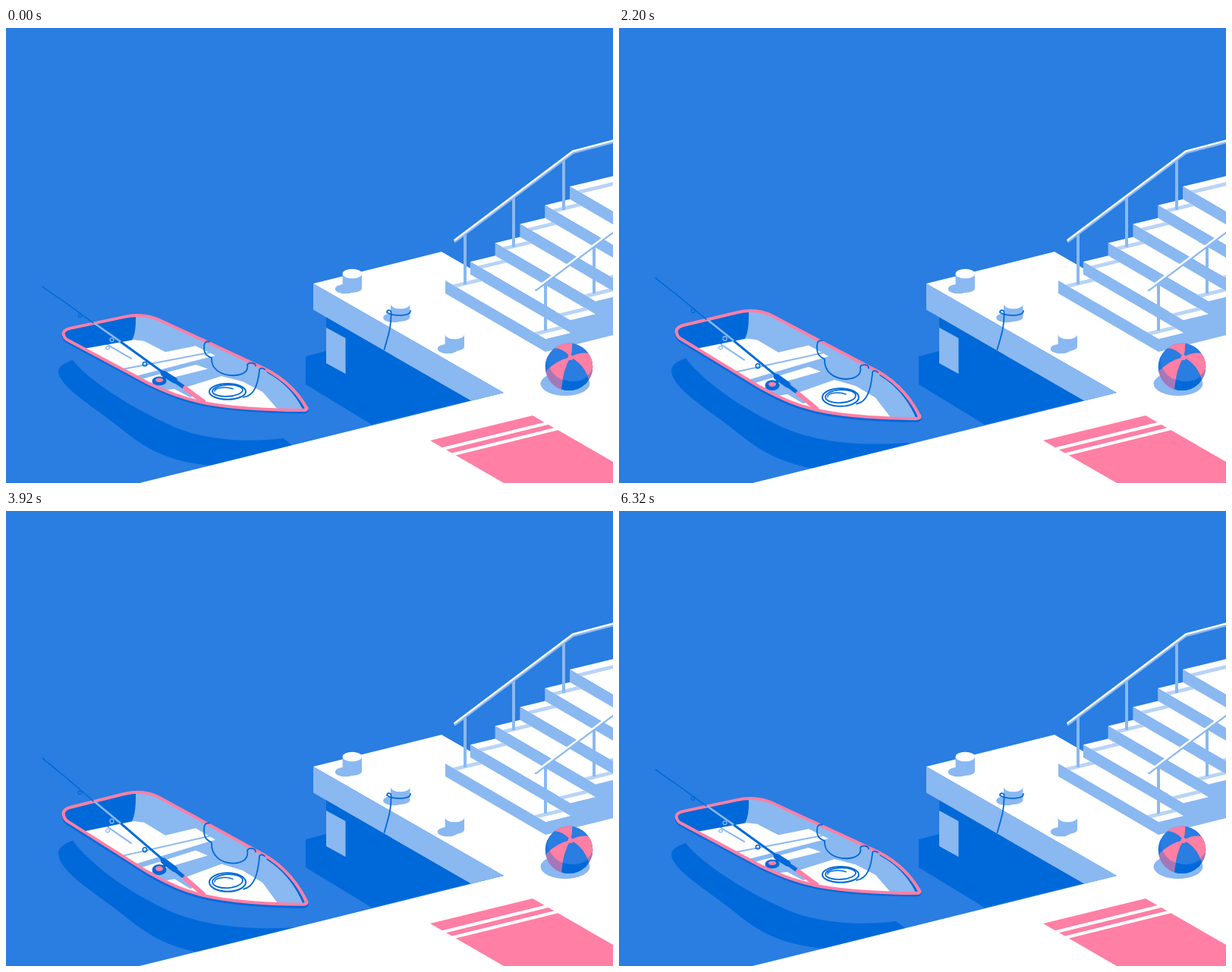
Write an HTML page that moves like this. It is 800 by 600 pixels and loops after 6360 ms.

```html
<!DOCTYPE html>
<html lang="en">
<head>
<meta charset="utf-8">
<title>Boat at the pier</title>
<style>
  html, body { margin: 0; width: 100%; height: 100%; overflow: hidden; background: #2a7de1; }
  svg { display: block; width: 800px; height: 600px; }
  .deep { fill: #0069d9; }
  .sea { fill: #2a7de1; }
  .pale { fill: #8ab8f1; }
  .white { fill: #fff; }
  .pink { fill: #ff7fa5; }
  .line { fill: none; stroke: #0069d9; stroke-width: 2; stroke-linecap: round; stroke-linejoin: round; }
  .line.light { stroke: #8ab8f1; }
  .line.rose { stroke: #ff7fa5; }
  .line.snow { stroke: #fff; }
  #boat *, #rim { vector-effect: non-scaling-stroke; }
</style>
</head>
<body>
<svg viewBox="0 0 800 600">
  <defs>
    <path id="rim" d="M76 400Q74 392.500 84 389L154 370.500Q180 363 202 375L265 411.500L330 449.500Q374 472 396.500 521Q397 524.500 391 524.500C345 524 300 521 265 513C235 506 215 496 188 480L80 407.500Q77 405 76 400Z"/>
    <clipPath id="hold"><use href="#rim"/></clipPath>
    <clipPath id="round"><circle cx="742" cy="446.800" r="31.300"/></clipPath>
  </defs>

  <rect class="sea" width="800" height="600"/>
  <path id="shade" class="deep"/>

  <g id="boat">
    <use href="#rim" class="line" y="3" style="stroke-width:4"/>
    <g clip-path="url(#hold)">
      <rect class="pale" x="60" y="350" width="350" height="190"/>
      <path class="deep" d="M60 380L171 360V374Q171 400 165 410L105 424L60 412Z"/>
      <path class="white" d="M105 422L168 408L182 410L210 428L250 418L276 434L164 470L100 440Z"/>
      <path class="line light" d="M152 457L268 429"/>
      <path class="white" d="M178 473L250 449L266 456L192 479Z"/>
      <path class="white" d="M205 492L238 486L284 468L312 477L338 494L363 530L250 525Z"/>
      <path class="line light" d="M216 481L243 499" style="stroke-width:6"/>
      <path class="line" d="M117 382L135 417" style="stroke-width:1.500"/>
      <path class="line light" d="M135 417L165 439"/>
      <ellipse class="line light" cx="134" cy="421.500" rx="2.500" ry="2" style="stroke-width:1.200"/>
      <path class="line" d="M345 461Q376 482 392 521" style="stroke-width:3"/>
    </g>
    <use href="#rim" class="line rose" style="stroke-width:4"/>

    <path class="line" d="M268 411C262 410 261 414 261 421C261 433 266 435 271 438C270 457 284 467 300 467C314 466 320 459 318 449C320 445 329 445 329 451M334 460C333 454 338 454 341 457M334 459C332 480 328 500 313 503" style="stroke-width:1.800"/>
    <ellipse class="line" cx="292" cy="493.500" rx="24" ry="13"/>
    <ellipse class="line" cx="292" cy="492" rx="20" ry="9.500" transform="rotate(-4 292 492)" style="stroke-width:1.800"/>
    <path class="line" d="M275 493C274 487 290 485 299 489" style="stroke-width:1.500"/>

    <path class="line" d="M50 321Q47 319 49 321L79 347L115 380" style="stroke-width:1.500"/>
    <ellipse class="line" cx="97.500" cy="368" rx="2.300" ry="2.500" style="stroke-width:1.200"/>
    <path class="line light" d="M117 381L151 411" style="stroke-width:2.500"/>
    <ellipse class="line light" cx="139.500" cy="408" rx="2.500" ry="3" style="stroke-width:1.300"/>
    <path class="line" d="M152 412L207 462" style="stroke-width:3"/>
    <ellipse class="line" cx="183" cy="448" rx="2.700" ry="3.200" style="stroke-width:1.500"/>
    <path class="line" d="M206 462L233 485" style="stroke-width:5"/>
    <path class="line" d="M208 464L222 475" style="stroke-width:8"/>
    <path class="line" d="M204 473L214 468" style="stroke-width:4"/>
    <ellipse class="deep" cx="202" cy="476" rx="9.500" ry="7.500"/>
    <ellipse class="pink" cx="202" cy="474.500" rx="5" ry="3.500"/>
    <path class="line rose" d="M236 488L260 510" style="stroke-width:6"/>
  </g>

  <path class="deep" d="M422 378L613 487V491L482 523L395 470V433L422 426Z"/>
  <path class="pale" d="M422 395L447.500 409V456L422 442Z"/>
  <path class="white" d="M405 337L574 295L711 374H800V600H176L656 481Z"/>
  <path class="pale" d="M405 337L656 481L613 491.500L405 371.500Z"/>
  <g id="bollards"></g>
  <path class="line" d="M533 373C533 380 512 381 502 375C502 371 508 371 507.500 376C508 395 503 408 498.500 424" style="stroke-width:1.800"/>

  <g id="stairs"></g>
  <g id="rails"></g>

  <ellipse class="pale" cx="737" cy="469" rx="32.500" ry="16"/>
  <g clip-path="url(#round)">
    <rect class="sea" x="710" y="414" width="65" height="65"/>
    <path class="pink" d="M744 434Q734 422 722 422L730 412H746Q747 424 744 434Z"/>
    <path class="pink" d="M744 434Q756 427 769 429L780 440V464H768Q763 444 744 434Z"/>
    <path class="pink" d="M744 434Q733 452 732 480L708 470L712 452Q726 438 744 434Z"/>
    <path fill="#0069d9" fill-opacity=".35" fill-rule="evenodd" d="M700 400H785V490H700ZM714 437A31 29 0 1 0 776 437A31 29 0 1 0 714 437Z"/>
    <path class="deep" d="M732 480Q732 471 735 464Q753 470 767 460L769 480Z"/>
  </g>
  <circle class="pink" cx="744" cy="434.500" r="3.500"/>

  <path class="pink" d="M559 544L694 511L800 572V600H656Z"/>
  <path class="line snow" d="M576 555L716 520.500M586 563L728 528" style="stroke-width:4"/>
</svg>
<script>
const $ = id => document.getElementById(id);
const poly = (x, y, pts, fill) =>
  `<polygon fill="${fill}" points="${pts.map(([a, b]) => `${x + a},${y + b}`).join(' ')}"/>`;
const PALE = '#8ab8f1', BAND = '#b8d3f7';

// Bollards: centre x, top y, height, shadow dx and dy
$('bollards').innerHTML = [[456.3, 324, 19, -9, 20], [519.7, 364, 17, -9, 18], [591.3, 404, 16, -9, 19]]
  .map(([x, y, h, dx, dy]) => `
    <ellipse class="pale" cx="${x + dx}" cy="${y + dy}" rx="13.500" ry="6.300"/>
    <path class="pale" d="M${x - 12.7} ${y}V${y + h}A12.700 6 0 0 0 ${x + 12.7} ${y + h}V${y}Z"/>
    <ellipse class="white" cx="${x}" cy="${y}" rx="12.700" ry="6.300"/>`).join('');

// Stairs, from the top step down
let steps = poly(0, 0, [[711, 427], [711, 410], [743, 402], [743, 385], [776, 377], [776, 360], [800, 354], [800, 405]], PALE);
for (let i = 5; i >= 0; i--) {
  const x = 579 + 32.8 * i, y = 333 - 24.8 * i;
  const d = i === 5 ? 2 : 1;
  const w = 33 * d, r = -8 * d;
  steps += poly(x, y, [[0, 0], [w, r], [w + 132, r + 77], [132, 77]], '#fff');
  for (const [a, b] of [[9.5, 5.5], [117, 68.3]])
    steps += poly(x, y, [[a, b], [a + w, b + r], [a + w + 6, b + r + 3.5], [a + 6, b + 3.5]], BAND);
  steps += poly(x, y, [[0, 0], [132, 77], [132, 94], [0, 17]], PALE);
}
$('stairs').innerHTML = steps;

const rail = (d, posts) =>
  posts.map(([x, a, b]) => `<path class="line light" style="stroke-width:4;stroke-linecap:butt" d="M${x} ${a}V${b}"/>`).join('') +
  `<path class="line light" style="stroke-width:3" transform="translate(.5 2)" d="${d}"/>` +
  `<path class="line snow" style="stroke-width:2.500" d="${d}"/>`;
$('rails').innerHTML =
  rail('M591.500 279.500L747 162.500L802 148', [[605, 271, 338], [669, 223, 289], [735, 173, 240]]) +
  rail('M698 343.500L802 265.500', [[711, 336, 399], [775, 288, 350]]);

// Height of the rocking boat over time: [ms, vertical scale]
const LOOP = 6360, PIVOT = 424, LOW = .797, HIGH = 1;
const sway = [
  [0, .797], [640, .912], [1280, 1], [1420, 1.006], [1560, 1], [1960, .952], [2200, .907], [2600, .837],
  [3060, .793], [3280, .815], [3840, .932], [4480, 1.003], [4640, 1.006], [4800, 1], [5160, .96],
  [5440, .907], [5800, .838], [6320, .797], [LOOP, .797]
];
const slope = sway.map((_, i) => {
  if (!i || i === sway.length - 1) return 0;
  const [a, b, c] = sway.slice(i - 1, i + 2);
  const s = (b[1] - a[1]) / (b[0] - a[0]), e = (c[1] - b[1]) / (c[0] - b[0]);
  return s * e <= 0 ? 0 : 2 * s * e / (s + e);
});

function scaleAt(t) {
  let i = 0;
  while (i < sway.length - 2 && t >= sway[i + 1][0]) i++;
  const [t0, a] = sway[i], [t1, b] = sway[i + 1];
  const h = t1 - t0, u = (t - t0) / h, v = 1 - u;
  return a * v * v * (1 + 2 * u) + b * u * u * (3 - 2 * u) + h * u * v * (slope[i] * v - slope[i + 1] * u);
}

function shadePath(k) {
  const m = (y, dy) => (y + dy * k).toFixed(2);
  return `M88 ${m(438, -5)}Q69 ${m(444, -4)} 69 ${m(453, -2)}` +
    `C70 ${m(474, 4)} 120 ${m(502, 4)} 155 ${m(531, 3)}` +
    `C190 ${m(559, 3)} 215 ${m(571, 8)} 275 ${m(578, 11)}L400 590L${376 + 25 * k} 549` +
    `L${365 + 25 * k} ${m(541, 11)}C${300 + 10 * k} ${m(549, 7)} ${245 + 10 * k} ${m(538, 8)} 215 ${m(523, 6)}` +
    `C${155 - 3 * k} ${m(496, 4)} 105 ${m(460, -2)} 88 ${m(438, -5)}Z`;
}

const start = performance.now();
function draw(now) {
  const t = Math.floor(Math.max(0, now - start) % LOOP / 40) * 40;
  const s = scaleAt(t);
  $('boat').setAttribute('transform', `translate(0 ${PIVOT * (1 - s)}) scale(1 ${s})`);
  $('shade').setAttribute('d', shadePath((s - LOW) / (HIGH - LOW)));
  requestAnimationFrame(draw);
}
draw(start);
</script>
</body>
</html>
```
